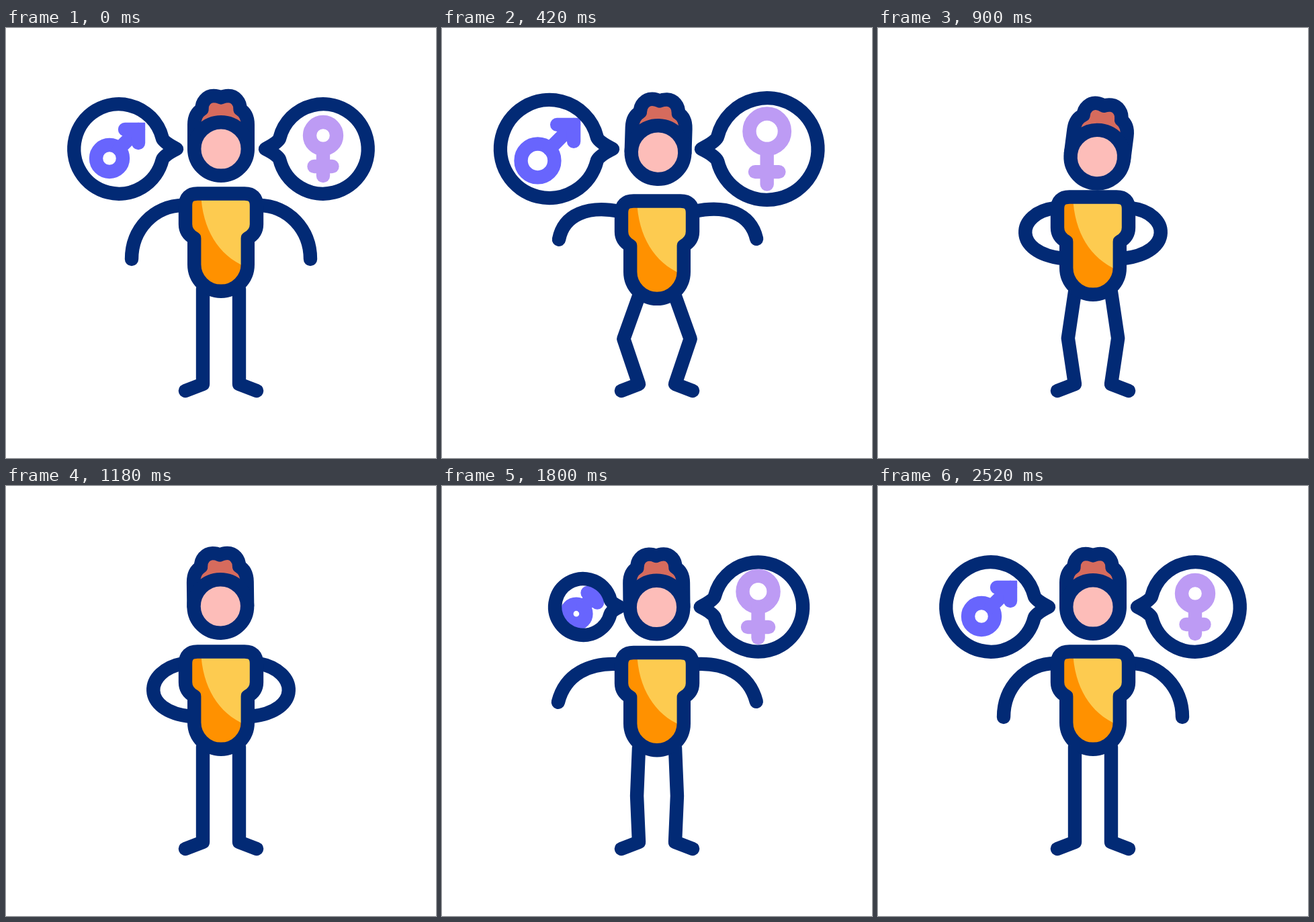
An HTML page with a canvas for the animation above (3600 ms loop, 640 px wide and 640 px high).

```html
<!DOCTYPE html>
<html lang="en">
<head>
<meta charset="utf-8">
<title>Figure with two speech bubbles</title>
<style>
  html, body { margin: 0; width: 100%; height: 100%; overflow: hidden; background: #fff; }
  canvas { display: block; width: 640px; height: 640px; }
</style>
</head>
<body>
<canvas id="stage" width="640" height="640"></canvas>
<script>
const ctx = document.getElementById('stage').getContext('2d');
const LOOP = 3600;
const NAVY = '#022a75', ORANGE = '#ff9100', YELLOW = '#fdcb50', PINK = '#fdbdb9',
      BROWN = '#d66b5d', VIOLET = '#6865fd', LILAC = '#bd9bf4';

// Smooth curve through [time, value] keys, flat at every turning point
function track(keys) {
  const slope = keys.slice(1).map((k, i) => (k[1] - keys[i][1]) / (k[0] - keys[i][0]));
  const tan = keys.map((k, i) => {
    const a = slope[i - 1], b = slope[i];
    return a * b > 0 ? 2 * a * b / (a + b) : 0;
  });
  return t => {
    if (t <= keys[0][0]) return keys[0][1];
    const n = keys.findIndex(k => k[0] > t);
    if (n < 0) return keys[keys.length - 1][1];
    const [t0, v0] = keys[n - 1], [t1, v1] = keys[n];
    const h = t1 - t0, u = (t - t0) / h, w = 1 - u;
    return v0 * (1 + 2 * u) * w * w + v1 * u * u * (3 - 2 * u) +
           h * u * w * (tan[n - 1] * w - tan[n] * u);
  };
}

const bodyDrop = track([[20, 0], [240, 5], [570, 14], [900, 5], [1080, 0], [1300, 0],
                        [1480, 3.4], [1590, 4.6], [1840, 1], [2040, 0]]);
const headDrop = track([[20, 0], [240, 0.5], [580, 10], [760, 12.5], [900, 11.3],
                        [1080, 3], [1310, -4], [1480, -1], [1640, 0.5], [2040, 0.5], [2400, 0]]);
const headTilt = track([[240, 0], [580, 4.2], [860, 7.4], [960, 7], [1390, -7.2],
                        [1480, -6.4], [1980, 1.2], [2400, 0]]);

// Left arm poses: two control points and the hand
const REST = [220, 264, 187, 300, 187, 344];
const WIDE = [220, 262, 183, 276, 170, 318];
const HIGH = [219, 261, 180, 271, 166, 311];
const BENT = [215, 272, 186, 300, 207, 328];
const HIPS = [205, 275, 200, 335, 275, 343];
const OPEN = [212, 265, 187, 308, 233, 325];
const poses = [[20, REST], [240, WIDE], [330, HIGH], [580, BENT], [820, HIPS],
               [1290, HIPS], [1480, OPEN], [1700, WIDE], [2040, [220, 264, 185, 297, 185, 339]],
               [2250, REST]];
const armTracks = REST.map((_, i) => track(poses.map(([t, p]) => [t, p[i]])));

function bubbleTrack(start, top, gone, back, topAgain, end, peak) {
  const scale = track([[start, 1], [top, peak], [gone, 0], [back, 0], [topAgain, peak], [end, 1]]);
  return t => {
    const s = scale(t);
    const over = t > top && t < topAgain ? 1 : Math.max(0, (s - 1) / (peak - 1));
    return { s, sign: s * (1 + 0.155 * over ** 1.7) };
  };
}
const leftBubble = bubbleTrack(100, 477, 815, 1600, 1967, 2467, 1.1);
const rightBubble = bubbleTrack(20, 393, 727, 1520, 1887, 2357, 1.159);

function stroke(path, color = NAVY, join = 'round') {
  ctx.strokeStyle = color;
  ctx.lineJoin = join;
  ctx.stroke(path);
}

function fill(path, color) {
  ctx.fillStyle = color;
  ctx.fill(path);
}

function circle(x, y, r) {
  const p = new Path2D();
  p.arc(x, y, r, 0, Math.PI * 2);
  return p;
}

function lines(...pts) {
  const p = new Path2D();
  pts.forEach(([x, y]) => p.lineTo(x, y));
  return p;
}

function at(x, y, draw) {
  ctx.save();
  ctx.translate(x, y);
  draw();
  ctx.restore();
}

function mirrored(draw) {
  at(640, 0, () => { ctx.scale(-1, 1); draw(); });
}

const torso = new Path2D(`M285 246.5H355Q373 246.5 373 264.5V292C373 303 367 309 359.8 313
  V352A39.8 39.8 0 0 1 280.2 352V313C273 309 267 303 267 292V264.5Q267 246.5 285 246.5Z`);
const torsoLight = new Path2D('M290 240C290 296 315 338 356 355V400H400V240Z');
const hair = new Path2D(`M280.2 180V144C280.2 134 283 126 291.5 121C291 110 299 101 309 101
  C313 101 317 102 320 103.5C323 102 327 101 331 101C341 101 349 110 348.5 121
  C357 126 359.8 134 359.8 144V180`);

function male(k) {
  const p = (x, y) => [x * k, y * k];
  stroke(circle(-14 * k, 14 * k, 20 * k), VIOLET);
  stroke(lines(p(0, 0), p(29, -29)), VIOLET);
  stroke(lines(p(9, -29), p(29, -29), p(29, -9)), VIOLET, 'miter');
}

function female(k) {
  stroke(circle(0, -20 * k, 20 * k), LILAC);
  stroke(lines([0, 0], [0, 40 * k]), LILAC);
  stroke(lines([-13.5 * k, 26 * k], [13.5 * k, 26 * k]), LILAC);
}

// Outline width stays fixed while the bubble grows from its tip
function bubble({ s, sign }, tip, dir, symbol) {
  if (s < 0.02) return;
  const shift = 15 * Math.max(0, 1 - s) ** 0.4;
  const shape = new Path2D();
  const a = 14 * Math.PI / 180, r = 66.7 * s;
  shape.arc(0, 0, r, a, Math.PI * 2 - a);
  shape.quadraticCurveTo(66 * s, -10 * s, 86 * s, 0);
  shape.quadraticCurveTo(66 * s, 10 * s, r * Math.cos(a), r * Math.sin(a));
  shape.closePath();
  at(tip + dir * (shift - 86 * s), 180, () => {
    fill(shape, '#fff');
    symbol(sign);
    ctx.scale(dir, 1);
    stroke(shape);
  });
}

function arm(t, drop) {
  const p = new Path2D();
  p.moveTo(264, 264 + drop * 0.8);
  p.bezierCurveTo(...armTracks.map(f => f(t)));
  stroke(p);
}

function leg(drop) {
  stroke(lines([293, 388 + drop], [293 - 2.05 * drop, 461 + drop * 0.15], [293, 530], [267, 540]));
}

function body(drop) {
  at(0, drop, () => {
    fill(torso, ORANGE);
    ctx.save();
    ctx.clip(torso);
    fill(torsoLight, YELLOW);
    ctx.restore();
    stroke(torso);
  });
}

function head(t) {
  at(320, 230 + headDrop(t), () => {
    ctx.rotate(headTilt(t) * Math.PI / 180);
    ctx.translate(-320, -230);
    const face = circle(320, 180, 39.8);
    fill(hair, BROWN);
    stroke(hair);
    fill(face, PINK);
    stroke(face);
  });
}

function draw(t) {
  ctx.fillStyle = '#fff';
  ctx.fillRect(0, 0, 640, 640);
  ctx.lineWidth = 20.4;
  ctx.lineCap = 'round';
  const drop = bodyDrop(t);
  bubble(leftBubble(t), 254, 1, male);
  bubble(rightBubble(t), 386, -1, female);
  leg(drop);
  arm(t, drop);
  mirrored(() => { leg(drop); arm(t - 14, drop); });
  body(drop);
  head(t);
}

const start = performance.now();
function tick() {
  draw((performance.now() - start) % LOOP);
  requestAnimationFrame(tick);
}
tick();
</script>
</body>
</html>
```
